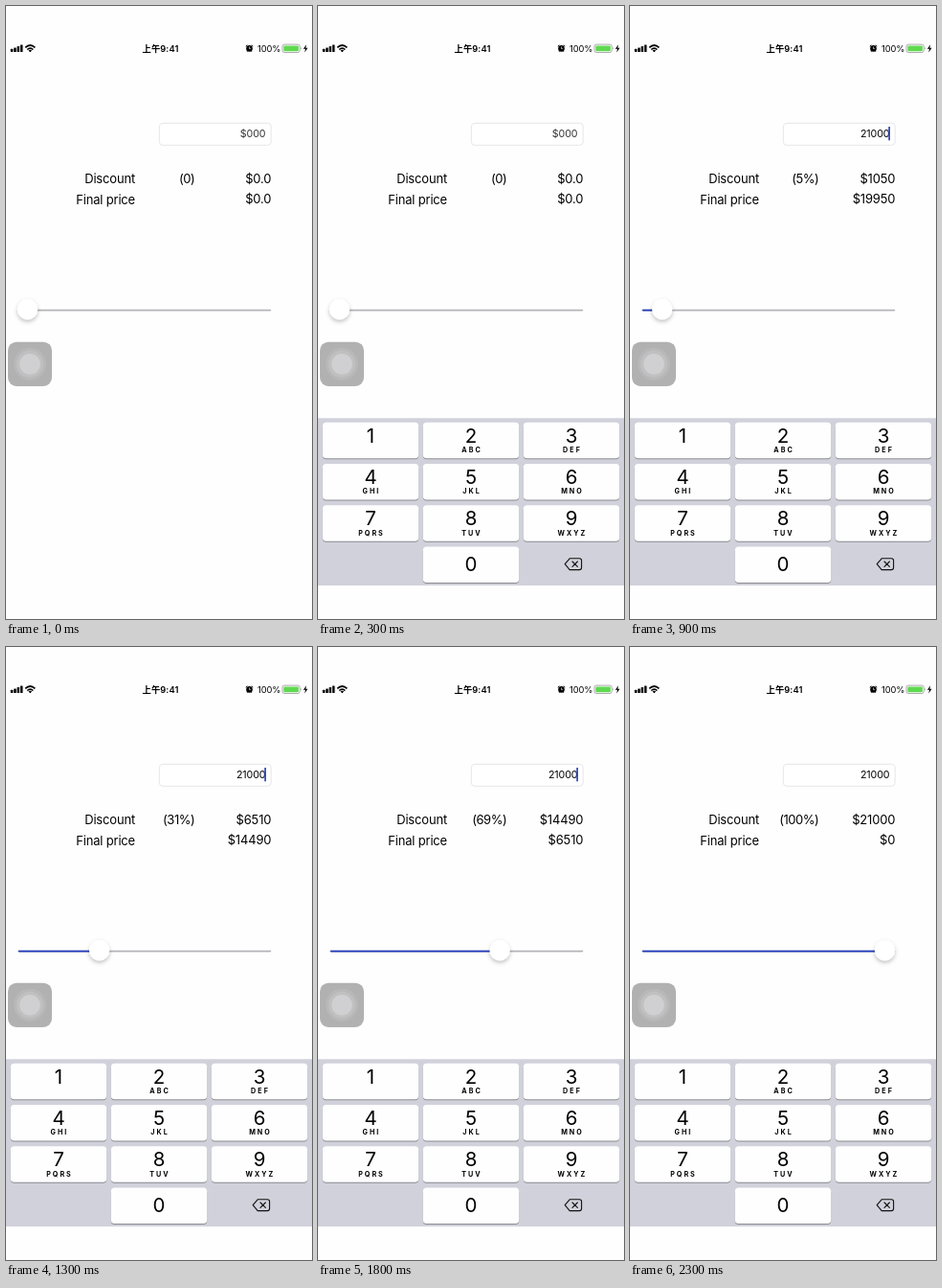
Animation of 320x640 px, one loop 2400 ms. Source, as an HTML page:

```html
<!DOCTYPE html>
<html lang="en">
<head>
<meta charset="utf-8">
<title>Discount calculator</title>
<style>
  html, body { margin: 0; width: 100%; height: 100%; overflow: hidden; background: #fefefe; }
  svg { display: block; width: 320px; height: 640px; }
  text { font: 13px Inter, "Noto Sans CJK TC", "Noto Sans CJK SC", "Noto Sans CJK", sans-serif; fill: #000; }
  .label { letter-spacing: -.18px; text-anchor: end; }
  #rate { letter-spacing: -.5px; }
  .field { font-size: 10.7px; letter-spacing: -.1px; text-anchor: end; }
  .status { font-size: 9.3px; letter-spacing: -.1px; }
  .time { font-weight: 600; letter-spacing: .1px; text-anchor: middle; }
  .digit { font-size: 20.5px; text-anchor: middle; }
  .letters { font-size: 7.2px; font-weight: 700; letter-spacing: 2px; text-anchor: middle; }
</style>
</head>
<body>
<svg viewBox="0 0 320 640">
  <defs>
    <clipPath id="screen"><rect y="35" width="320" height="570"/></clipPath>
    <filter id="soft" x="-50%" y="-50%" width="200%" height="200%">
      <feDropShadow dx="0" dy="2.2" stdDeviation="2" flood-color="#000" flood-opacity=".25"/>
    </filter>
  </defs>

  <g id="bars"></g>
  <g fill="none" stroke="#000" stroke-width="1.7">
    <path d="M20.2 43.4Q25.3 38.6 30.4 43.4M22.2 45.5Q25.3 42.6 28.4 45.5"/>
    <path d="M23.5 46.4Q25.3 45 27.1 46.4L25.3 48.3Z" fill="#000" stroke="none"/>
  </g>
  <text class="status time" x="161.5" y="47.8">上午9:41</text>
  <g stroke="#000" fill="none">
    <circle cx="254.5" cy="44.4" r="3.3" fill="#000" stroke="none"/>
    <path d="M250.8 42.2L252.3 40.8M258.2 42.2L256.7 40.8M252.5 47.2L252 47.9M256.5 47.2L257 47.9" stroke-width=".9"/>
    <path d="M254.5 42.4V44.6H256.2" stroke="#fff" stroke-width=".6"/>
  </g>
  <text class="status" x="263" y="47.8">100%</text>
  <rect x="289" y="40.1" width="18.2" height="8.4" rx="2" fill="#fff" stroke="#888" stroke-width=".7"/>
  <rect x="290.3" y="41.4" width="15.6" height="5.8" rx="1" fill="#5fd950"/>
  <path d="M308.2 42.8Q309.7 44.3 308.2 45.8Z" fill="#888"/>
  <path d="M314.2 40.3L310.9 44.8H313.1L312.2 48.4L315.6 43.7H313.4Z"/>

  <rect x="160.4" y="122.3" width="116.8" height="23" rx="3.5" fill="#fff" stroke="#e4e4e6" stroke-width=".9"/>
  <text id="price" class="field" x="271.5" y="137.1"></text>
  <rect id="caret" x="270.3" y="126" width="1.6" height="14.3" fill="#2239b8"/>

  <text class="label" x="135" y="184.6">Discount</text>
  <text class="label" x="135" y="206.6">Final price</text>
  <text id="rate" class="label" x="197.2" y="184.6"></text>
  <text id="off" class="label" x="277.3" y="184.6"></text>
  <text id="total" class="label" x="277.3" y="206.3"></text>

  <rect x="12.7" y="316.7" width="264.6" height="1.7" rx=".8" fill="#b5b3b8"/>
  <rect id="fill" x="12.7" y="316.7" height="1.7" rx=".8" fill="#223cc0"/>
  <circle id="thumb" cy="316.7" r="10.6" fill="#fff" filter="url(#soft)"/>

  <rect x="2" y="350.7" width="46" height="46.2" rx="9" fill="#b1b1b1"/>
  <circle cx="25" cy="373.8" r="17" fill="#b8b8b8"/>
  <circle cx="25" cy="373.8" r="14" fill="#c0c0c0"/>
  <circle cx="25" cy="373.8" r="10.8" fill="#d0cfd1"/>

  <g clip-path="url(#screen)"><g id="pad">
    <rect y="430.3" width="320" height="174.7" fill="#d0d1da"/>
    <g id="keys"></g>
    <path d="M263.2 576.8H273.3Q275.6 576.8 275.6 579.1V586.3Q275.6 588.6 273.3 588.6H263.2L258.2 582.7Z
             M266 580L271.4 585.4M271.4 580L266 585.4" fill="none" stroke="#111" stroke-width="1.1" stroke-linejoin="round" stroke-linecap="round"/>
  </g></g>
</svg>
<script>
const $ = id => document.getElementById(id);

function add(parent, tag, attrs, text = "") {
  const el = document.createElementNS("http://www.w3.org/2000/svg", tag);
  for (const k in attrs) el.setAttribute(k, attrs[k]);
  el.textContent = text;
  return parent.appendChild(el);
}

for (let i = 0; i < 4; i++) {
  const h = 3.2 + i * 1.4;
  add($("bars"), "rect", { x: 4.8 + i * 3.4, y: 48 - h, width: 2.5, height: h, rx: .5 });
}

const letters = ["", "ABC", "DEF", "GHI", "JKL", "MNO", "PQRS", "TUV", "WXYZ"];
const keys = {};
function addKey(digit, col, row, sub) {
  const x = 4.8 + col * 105, y = 434.8 + row * 43.25, mid = x + 50.2;
  const box = { x, width: 100.4, height: 37.5, rx: 3.8 };
  add($("keys"), "rect", { ...box, y: y + .9, fill: "#8b8c91" });
  keys[digit] = add($("keys"), "rect", { ...box, y });
  add($("keys"), "text", { class: "digit", x: mid, y: y + (row === 3 ? 25.5 : 20.8) }, digit);
  if (sub) add($("keys"), "text", { class: "letters", x: mid + 1, y: y + 31.3 }, sub);
}
letters.forEach((sub, i) => addKey(i + 1, i % 3, Math.floor(i / 3), sub));
addKey(0, 1, 3);

const STEP = 100, LOOP = 2400, PRICE = 21000;
// step: [typed text, pressed key]
const typing = { 4: ["2", 2], 5: ["21", 1], 6: ["2100", 0], 7: ["21000", null] };
// slider position in percent as [step, value]
const drag = [[7, 0], [8, 1], [9, 4.6], [13, 30.8], [18, 68.7], [22, 96], [23, 100]];

function sliderAt(step) {
  const i = drag.findIndex(([s]) => s >= step);
  if (i === 0) return 0;
  const [s0, v0] = drag[i - 1], [s1, v1] = drag[i];
  return v0 + (v1 - v0) * (step - s0) / (s1 - s0);
}

function draw(step) {
  const [typed, pressed] = typing[Math.min(step, 7)] || ["", null];
  const value = sliderAt(step), percent = Math.round(value);
  const discount = PRICE * percent / 100;

  $("price").textContent = typed || "$000";
  $("price").style.fill = typed ? "#000" : "#333";
  $("caret").style.display = typed && step < 23 ? "" : "none";
  $("rate").textContent = percent ? `(${percent}%)` : "(0)";
  $("off").textContent = percent ? "$" + discount : "$0.0";
  $("total").textContent = percent ? "$" + (PRICE - discount) : "$0.0";

  const x = 22.5 + value * 2.44;
  $("thumb").setAttribute("cx", x);
  $("fill").setAttribute("width", value ? x - 12.7 : 0);

  $("pad").style.display = step < 2 ? "none" : "";
  $("pad").setAttribute("transform", `translate(0 ${step === 2 ? 50 : 0})`);
  for (const d in keys) keys[d].setAttribute("fill", Number(d) === pressed ? "#b4c2cf" : "#fefefe");
}

let shown = -1;
const start = performance.now();
function tick() {
  const step = Math.floor((performance.now() - start) % LOOP / STEP);
  if (step !== shown) draw(shown = step);
  requestAnimationFrame(tick);
}
tick();
</script>
</body>
</html>
```
